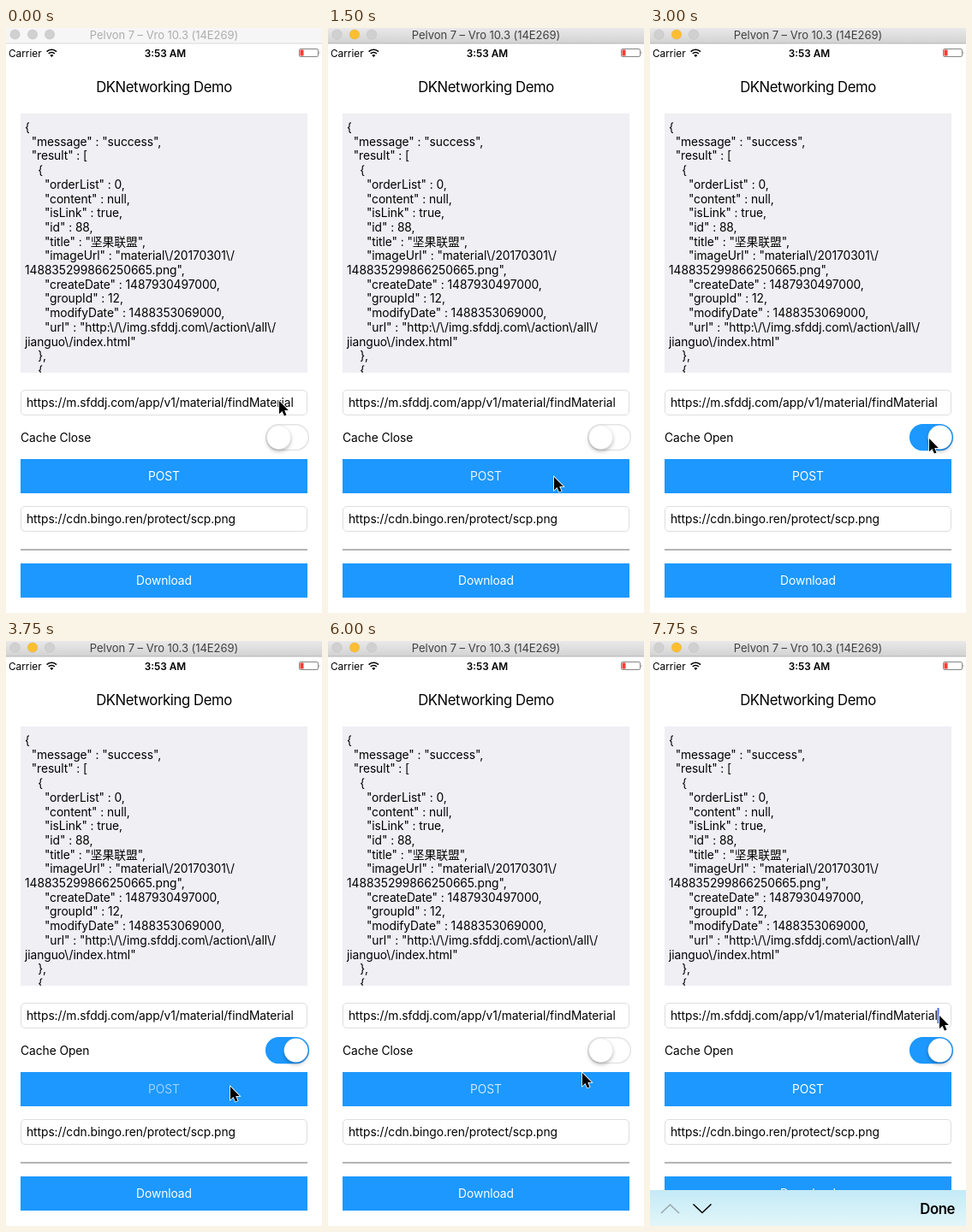
Recreate the animation shown at these times as an HTML page. Size 369x684 px, loop 8 s.

```html
<!DOCTYPE html>
<html lang="en">
<head>
<meta charset="utf-8">
<title>Networking demo</title>
<style>
  html, body { margin: 0; width: 100%; height: 100%; overflow: hidden; background: #fff; }
  svg { display: block; width: 369px; height: 684px; }
  text {
    font: 13.8px Inter, "Noto Sans CJK SC", "Noto Sans CJK", sans-serif;
    letter-spacing: -.06px; white-space: pre; fill: #000;
  }
  .mid { text-anchor: middle; }
  #winTitle { font-size: 13px; letter-spacing: -.05px; }
  .status { font-size: 11.8px; letter-spacing: 0; }
  .head { font-size: 16.7px; letter-spacing: -.4px; }
  .bold { font-weight: 600; }
  .btn { fill: #1c98ff; }
  .btn + text { fill: #fff; }
  .field { fill: #fff; stroke: #dedede; }
  .line { fill: none; stroke-width: 1.6; }
  #cursor { paint-order: stroke; stroke: #fff; stroke-width: 1.6; }
</style>
</head>
<body>
<svg viewBox="0 0 369 684">
  <defs>
    <linearGradient id="chrome" x2="0" y2="1">
      <stop stop-color="#e9e9e9"/><stop offset="1" stop-color="#d2d2d2"/>
    </linearGradient>
    <linearGradient id="glass" x2="0" y2="1">
      <stop stop-color="#c4eaf7"/><stop offset="1" stop-color="#e2f6f9"/>
    </linearGradient>
    <filter id="drop" x="-30%" y="-30%" width="160%" height="180%">
      <feDropShadow dx="0" dy="2.5" stdDeviation="2" flood-opacity=".27"/>
    </filter>
    <clipPath id="viewClip"><rect x="17" y="100" width="335" height="303"/></clipPath>
  </defs>

  <rect width="369" height="684" fill="#fff"/>
  <rect id="winBar" width="369" height="18"/>
  <rect id="winEdge" y="17.5" width="369" height="1"/>
  <g id="lights" stroke="#000" stroke-opacity=".08" stroke-width=".7" fill="#d0d0d0">
    <circle cx="10.5" cy="7.5" r="5.8"/>
    <circle id="amber" cx="31" cy="7.5" r="5.8"/>
    <circle cx="51" cy="7.5" r="5.8"/>
  </g>
  <text id="winTitle" class="mid" x="184.5" y="13">Pelvon 7 – Vro 10.3 (14E269)</text>

  <text class="status" x="3" y="33.5">Carrier</text>
  <g class="line" stroke="#000">
    <path d="M47.6 27.6a8 8 0 0 1 11.4 0M49.7 30a5 5 0 0 1 7.2 0"/>
    <path d="M53.3 34l-2-2.1a2.8 2.8 0 0 1 4 0z" fill="#000" stroke="none"/>
  </g>
  <text class="status bold mid" x="186" y="33.5">3:53 AM</text>
  <rect x="342.5" y="24.5" width="22" height="9" rx="1.6" fill="#fff" stroke="#666" stroke-width=".8"/>
  <rect x="343.5" y="25.5" width="4" height="7" rx=".5" fill="#ff3b30"/>
  <path d="M365.7 27.4q1.6 1.6 0 3.2z" fill="#666"/>

  <text class="head mid" x="184.5" y="75">DKNetworking Demo</text>
  <rect x="17" y="100" width="335" height="303" fill="#efeff4"/>
  <g id="result" clip-path="url(#viewClip)"></g>
  <text id="loading" x="22" y="121">Loading...</text>

  <rect class="field" x="17.5" y="423.5" width="334" height="29" rx="4.5"/>
  <text x="24" y="443">https://m.sfddj.com/app/v1/material/findMaterial</text>
  <rect id="caret" x="335.5" y="429" width="2" height="18" fill="#426bf2"/>

  <text id="cache" x="17" y="484"></text>
  <rect id="track" x="303.7" y="463.7" width="49.6" height="29.8" rx="14.9" stroke-width="1.5"/>
  <circle id="knob" cy="478.6" r="14" fill="#fff" stroke="#000" stroke-opacity=".12" stroke-width=".6" filter="url(#drop)"/>

  <rect class="btn" x="17" y="504" width="335" height="40"/>
  <text id="post" class="mid" x="184.5" y="529">POST</text>
  <rect class="field" x="17.5" y="559.5" width="334" height="29" rx="4.5"/>
  <text x="24" y="579">https://cdn.bingo.ren/protect/scp.png</text>
  <rect x="17" y="609" width="335" height="2" fill="#b5b5b5"/>
  <rect class="btn" x="17" y="626" width="335" height="40"/>
  <text class="mid" x="184.5" y="651">Download</text>

  <g id="bar">
    <rect width="369" height="42" fill="url(#glass)"/>
    <path class="line" d="M13 27l10.5-10L34 27" stroke="#9aa8ac"/>
    <path class="line" d="M50.5 16.5l10.5 10 10.5-10" stroke="#000"/>
    <text class="head bold" x="356" y="28" text-anchor="end">Done</text>
  </g>

  <path id="cursor" d="M0 0V15.2L3.5 11.9 5.9 17.5 8.5 16.4 6.2 10.9H10.8Z"/>
</svg>

<script>
const LOOP = 8000, STEP = 250, BLUE = '#1c98ff';
const FOCUS = 750, EDIT = 7250, SLIDE = 500, WAIT = 400, FADE = 700;
const taps = [1000, 3500, 5600];
const toggles = [3000, 5250, 6500];

// Cursor stops: [time, x, y]
const stops = [
  [0, 319, 436], [750, 264, 525], [1500, 264, 525], [2000, 300, 502],
  [3000, 326, 480], [3500, 262, 521], [4250, 262, 521], [5250, 320, 480],
  [5500, 292, 509], [6000, 297, 505], [6500, 326, 480], [7250, 338, 438]
];

const json = String.raw`{
  "message" : "success",
  "result" : [
    {
      "orderList" : 0,
      "content" : null,
      "isLink" : true,
      "id" : 88,
      "title" : "坚果联盟",
      "imageUrl" : "material\/20170301\/
148835299866250665.png",
      "createDate" : 1487930497000,
      "groupId" : 12,
      "modifyDate" : 1488353069000,
      "url" : "http:\/\/img.sfddj.com\/action\/all\/
jianguo\/index.html"
    },
    {`;

const el = id => document.getElementById(id);
const clamp = v => Math.max(0, Math.min(1, v));
const ease = v => v * v * (3 - 2 * v);
const set = (id, attrs) => {
  for (const k in attrs) el(id).setAttribute(k, attrs[k]);
};

json.split('\n').forEach((line, i) => {
  const row = document.createElementNS('http://www.w3.org/2000/svg', 'text');
  row.setAttribute('x', 22);
  row.setAttribute('y', 121 + i * 16.7);
  row.textContent = line;
  el('result').append(row);
});

function cursorAt(t) {
  const i = stops.findIndex(s => s[0] > t);
  if (i < 0) return stops[stops.length - 1].slice(1);
  const [t0, x0, y0] = stops[i - 1], [t1, x1, y1] = stops[i];
  const f = (t - t0) / (t1 - t0);
  return [x0 + (x1 - x0) * f, y0 + (y1 - y0) * f];
}

function draw(t) {
  const active = t >= FOCUS;
  const open = toggles.filter(x => x <= t).length % 2 === 1;
  const tap = taps.filter(x => x <= t).pop();
  const age = tap === undefined ? Infinity : t - tap;
  const loading = !open && age < WAIT;

  set('winBar', { fill: active ? 'url(#chrome)' : '#f6f6f6' });
  set('winEdge', { fill: active ? '#b3b3b3' : '#d9d9d9' });
  set('amber', { fill: active ? '#fdbe30' : '#d0d0d0' });
  el('winTitle').style.fill = active ? '#404040' : '#adadad';

  set('result', { opacity: loading ? 0 : 1 });
  set('loading', { opacity: loading ? 1 : 0 });
  set('post', { opacity: clamp(.2 + age / FADE) });

  el('cache').textContent = open ? 'Cache Open' : 'Cache Close';
  set('track', { fill: open ? BLUE : '#fff', stroke: open ? BLUE : '#e4e4e4' });
  set('knob', { cx: open ? 338.6 : 318.6 });

  set('caret', { opacity: t >= EDIT + SLIDE ? 1 : 0 });
  set('bar', { transform: `translate(0 ${684 - 42 * ease(clamp((t - EDIT) / SLIDE))})` });
  set('cursor', { transform: `translate(${cursorAt(t).join(' ')})` });
}

const start = performance.now();
function tick() {
  const t = (performance.now() - start) % LOOP;
  draw(Math.floor(t / STEP) * STEP);
  requestAnimationFrame(tick);
}
tick();
</script>
</body>
</html>
```
